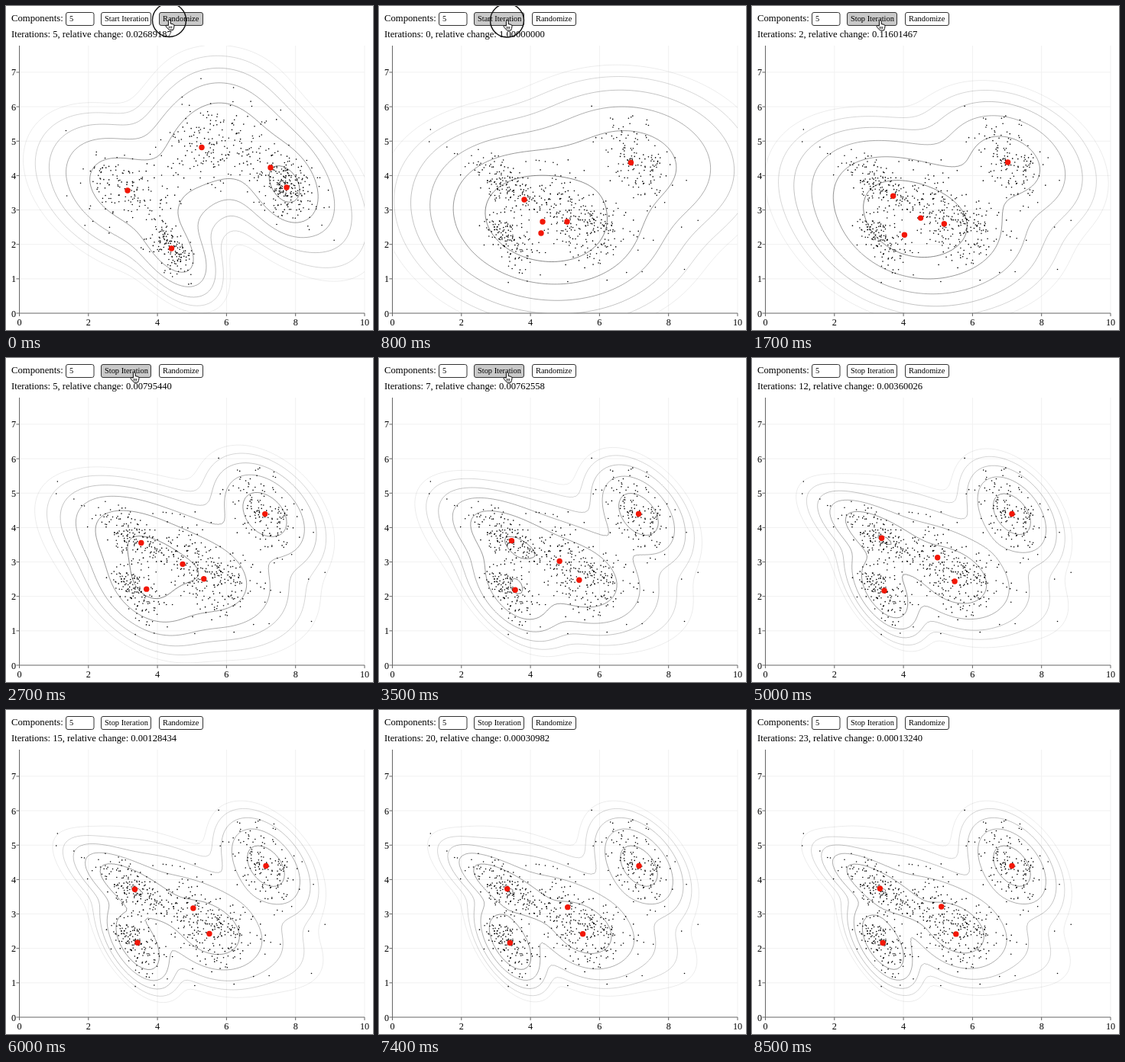
An HTML page with a canvas that plays this animation: 480x425 px, repeating every 8600 ms.

```html
<!DOCTYPE html>
<html lang="en">
<head>
<meta charset="utf-8">
<title>Gaussian mixture fitting</title>
<style>
  html, body { margin: 0; height: 100%; overflow: hidden; background: #fff; }
  canvas { display: block; }
</style>
</head>
<body>
<canvas id="stage" width="480" height="425"></canvas>
<script>
const ctx = document.getElementById('stage').getContext('2d');
const LOOP = 8600, STEP = 100, RANDOMIZE = 500, RUN = 968, PERIOD = 319.5;
const LEFT = 17.5, TOP = 52, RIGHT = 469, BOTTOM = 403, UNIT = 45.15;
const FONT = '"Liberation Serif", "Times New Roman", serif';

const lerp = (a, b, k) => a + (b - a) * k;
const clamp = v => Math.max(0, Math.min(1, v));

const area = g => g.sx * g.sy * Math.sqrt(1 - g.r * g.r);
const gaussian = (x, y, sx, sy, r, peak) => ({ x, y, sx, sy, r, peak });

const oldModel = [
  gaussian(159, 242, 45, 38, .35, .6),
  gaussian(216.5, 318, 25, 28, .5, .6),
  gaussian(256, 185.5, 40, 42, -.25, .6),
  gaussian(346, 212, 48, 50, .58, .45),
  gaussian(367, 238, 21, 26, .25, .8)
];

// Every component starts as the same broad blob at (x, y) and settles exponentially.
function component(x, y, settle, fitted) {
  const first = gaussian(x, y, 61, 43, .1, .45);
  fitted.peak = Math.log(1050 / area(fitted));
  return { first, settle, fitted };
}
const components = [
  component(190, 254, 5.5, gaussian(167, 234, 30, 22, .78)),
  component(212, 298, 4, gaussian(171, 305.5, 18.6, 24.3, .55)),
  component(214, 283, 7, gaussian(249, 257, 64, 40, .7)),
  component(246, 283, 5, gaussian(267, 294, 31, 27, .3)),
  component(329.5, 205.5, 2.2, gaussian(340, 204.5, 26.3, 28.7, .42))
];

function modelAt(progress) {
  return components.map(({ first, settle, fitted }) => {
    const k = 1 - Math.exp(-progress / settle), g = {};
    for (const key in first) g[key] = lerp(first[key], fitted[key], k);
    return g;
  });
}

// Readouts of the relative change by iteration; geometric in between.
const CHANGES = [[0, 1], [2, .11601467], [5, .0079544], [10, .00715765],
  [15, .00128434], [20, .00030982], [23, .0001324]];

function span(keys, at) {
  let i = 0;
  while (i < keys.length - 2 && at >= keys[i + 1][0]) i++;
  const [from, a] = keys[i], [to, b] = keys[i + 1];
  return { a, b, k: clamp((at - from) / (to - from)) };
}

function changeAt(iteration) {
  const { a, b, k } = span(CHANGES, iteration);
  return Math.exp(lerp(Math.log(a), Math.log(b), k)).toFixed(8);
}

function randomSource(seed) {
  return () => {
    seed = seed + 0x6D2B79F5 | 0;
    let z = Math.imul(seed ^ seed >>> 15, 1 | seed);
    z = z + Math.imul(z ^ z >>> 7, 61 | z) ^ z;
    return ((z ^ z >>> 14) >>> 0) / 4294967296;
  };
}

function samplePoints(model, spread, seed) {
  const random = randomSource(seed);
  return model.flatMap(({ x, y, sx, sy, r }) => Array.from({ length: 155 }, () => {
    const radius = spread * Math.sqrt(-2 * Math.log(1 - random()));
    const angle = random() * 2 * Math.PI;
    const u = radius * Math.cos(angle), v = radius * Math.sin(angle);
    return [x + sx * u, y + sy * (r * u + Math.sqrt(1 - r * r) * v)];
  }));
}

const oldPoints = samplePoints(oldModel, .68, 11);
const newPoints = samplePoints(components.map(c => c.fitted), .9, 5);

function logDensity(model) {
  const terms = model.map(({ x, y, sx, sy, r, peak }) => {
    const d = -.5 / (1 - r * r);
    return [peak, x, y, d / (sx * sx), d / (sy * sy), -2 * r * d / (sx * sy)];
  });
  return (px, py) => {
    let sum = 1e-12;
    for (const [peak, x, y, a, b, c] of terms) {
      const dx = px - x, dy = py - y;
      sum += Math.exp(peak + a * dx * dx + b * dy * dy + c * dx * dy);
    }
    return Math.log(sum);
  };
}

function drawContours(model) {
  const cell = 4, cols = 114, rows = 89, density = logDensity(model);
  const grid = [];
  for (let j = 0; j <= rows; j++)
    for (let i = 0; i <= cols; i++) {
      const x = LEFT + i * cell, y = TOP + j * cell;
      grid.push([x, y, density(x, y)]);
    }
  const paths = Array.from({ length: 6 }, () => new Path2D());

  function cutTriangle(p, q, r) {
    const low = Math.min(p[2], q[2], r[2]), high = Math.max(p[2], q[2], r[2]);
    for (let n = Math.max(-4, Math.ceil(low)); n <= Math.min(1, high); n++) {
      let started = false;
      for (const [a, b] of [[p, q], [q, r], [r, p]]) {
        if ((a[2] < n) === (b[2] < n)) continue;
        const k = (n - a[2]) / (b[2] - a[2]);
        paths[n + 4][started ? 'lineTo' : 'moveTo'](lerp(a[0], b[0], k), lerp(a[1], b[1], k));
        started = true;
      }
    }
  }

  for (let j = 0; j < rows; j++)
    for (let i = 0; i < cols; i++) {
      const n = j * (cols + 1) + i, m = n + cols + 1;
      cutTriangle(grid[n], grid[n + 1], grid[m]);
      cutTriangle(grid[n + 1], grid[m + 1], grid[m]);
    }
  ctx.lineWidth = 1;
  paths.forEach((path, i) => {
    ctx.strokeStyle = `rgba(0,0,0,${.08 + .08 * i})`;
    ctx.stroke(path);
  });
}

function line(x1, y1, x2, y2, color) {
  ctx.strokeStyle = color;
  ctx.lineWidth = 1;
  ctx.beginPath();
  ctx.moveTo(x1, y1);
  ctx.lineTo(x2, y2);
  ctx.stroke();
}

function text(str, x, y, size, align = 'left') {
  ctx.font = `${size}px ${FONT}`;
  ctx.textAlign = align;
  ctx.fillStyle = '#000';
  ctx.fillText(str, x, y);
}

function disc(x, y, r, color) {
  ctx.fillStyle = color;
  ctx.beginPath();
  ctx.arc(x, y, r, 0, 2 * Math.PI);
  ctx.fill();
}

function box(x, width, label, hover) {
  ctx.beginPath();
  ctx.roundRect(x + .5, 8.5, width, 17, 2.5);
  ctx.fillStyle = hover ? '#c9c9c9' : '#fff';
  ctx.fill();
  ctx.strokeStyle = '#333';
  ctx.lineWidth = 1;
  ctx.stroke();
  text(label, x + 5, 20.3, 10.4);
}

const GRID = '#f1f1f1', AXIS = '#666';
const toX = v => LEFT + v * UNIT, toY = v => BOTTOM - v * UNIT;

function drawGrid() {
  for (let v = 2; v <= 10; v += 2) line(toX(v), TOP, toX(v), BOTTOM, GRID);
  for (let v = 1; v <= 7; v++) line(LEFT, toY(v), RIGHT, toY(v), GRID);
}

function drawAxes() {
  line(LEFT, TOP, LEFT, BOTTOM, AXIS);
  line(LEFT, BOTTOM, RIGHT, BOTTOM, AXIS);
  for (let v = 0; v <= 10; v += 2) {
    line(toX(v), BOTTOM, toX(v), BOTTOM + 4, AXIS);
    text(v, toX(v), 419, 12.2, 'center');
  }
  for (let v = 0; v <= 7; v++) {
    line(LEFT - 4, toY(v), LEFT, toY(v), AXIS);
    text(v, 13, toY(v) + 4.5, 12.2, 'right');
  }
}

const HAND = new Path2D('M-1.6 7V1.2a1.4 1.4 0 0 1 2.8 0V4.6l3.4.8q1.6.4 1.4 2l-.5 3-1 2.6h-5L-4.6 8.6q-1-1.6.6-2z');
const ARROW = new Path2D('M0 0V13l3-2.8 2.2 5 2.2-1-2.2-4.8H9.4z');
const POINTER = [[0, [214, 18.5]], [300, [163, 226]], [500, [163, 226]], [800, [168, 19]]];

function drawPointer(t) {
  if (t >= 4400) return;
  const { a, b, k } = span(POINTER, t);
  const x = lerp(a[0], b[0], k), y = lerp(a[1], b[1], k);
  const overButton = y < 26;
  const [shape, fill, edge] = overButton ? [HAND, '#fff', '#000'] : [ARROW, '#000', '#fff'];
  ctx.save();
  ctx.translate(x, y);
  ctx.fillStyle = fill;
  ctx.strokeStyle = edge;
  ctx.lineWidth = 1;
  ctx.fill(shape);
  ctx.stroke(shape);
  if (overButton) for (const dx of [-.8, 1, 2.8]) line(dx, 8, dx, 11, '#333');
  ctx.restore();
  if (t < 100 || (t >= 800 && t < 1000)) {
    ctx.strokeStyle = '#111';
    ctx.lineWidth = 1.4;
    ctx.beginPath();
    ctx.arc(x - .5, y, 22, 0, 2 * Math.PI);
    ctx.stroke();
  }
}

function draw(t) {
  const fresh = t >= RANDOMIZE;
  const iteration = Math.max(0, Math.floor((t - RUN) / PERIOD));
  const sinceUpdate = t - RUN - iteration * PERIOD;
  const progress = Math.max(0, iteration - 1 + clamp(sinceUpdate / 200));
  const model = fresh ? modelAt(progress) : oldModel;

  ctx.fillStyle = '#fff';
  ctx.fillRect(0, 0, 480, 425);
  drawGrid();
  ctx.save();
  ctx.beginPath();
  ctx.rect(LEFT, TOP, RIGHT - LEFT, BOTTOM - TOP);
  ctx.clip();
  drawContours(model);
  for (const [x, y] of fresh ? newPoints : oldPoints) disc(x, y, .8, '#000');
  ctx.restore();
  for (const { x, y } of model) disc(x, y, 3.7, '#f21707');
  drawAxes();

  text('Components:', 7, 20.3, 12.7);
  box(78, 36.5, '5', false);
  box(124, 65, t >= 900 ? 'Stop Iteration' : 'Start Iteration', t >= 800 && t < 4400);
  box(200, 57, 'Randomize', t < 100);
  text(fresh
    ? `Iterations: ${iteration}, relative change: ${changeAt(iteration)}`
    : 'Iterations: 5, relative change: 0.02689187', 7, 40.8, 12.6);
  drawPointer(t);
}

const began = performance.now();
let shown = -1;
function tick() {
  const t = Math.floor((performance.now() - began) % LOOP / STEP) * STEP;
  if (t !== shown) draw(shown = t);
  requestAnimationFrame(tick);
}
tick();
</script>
</body>
</html>
```
